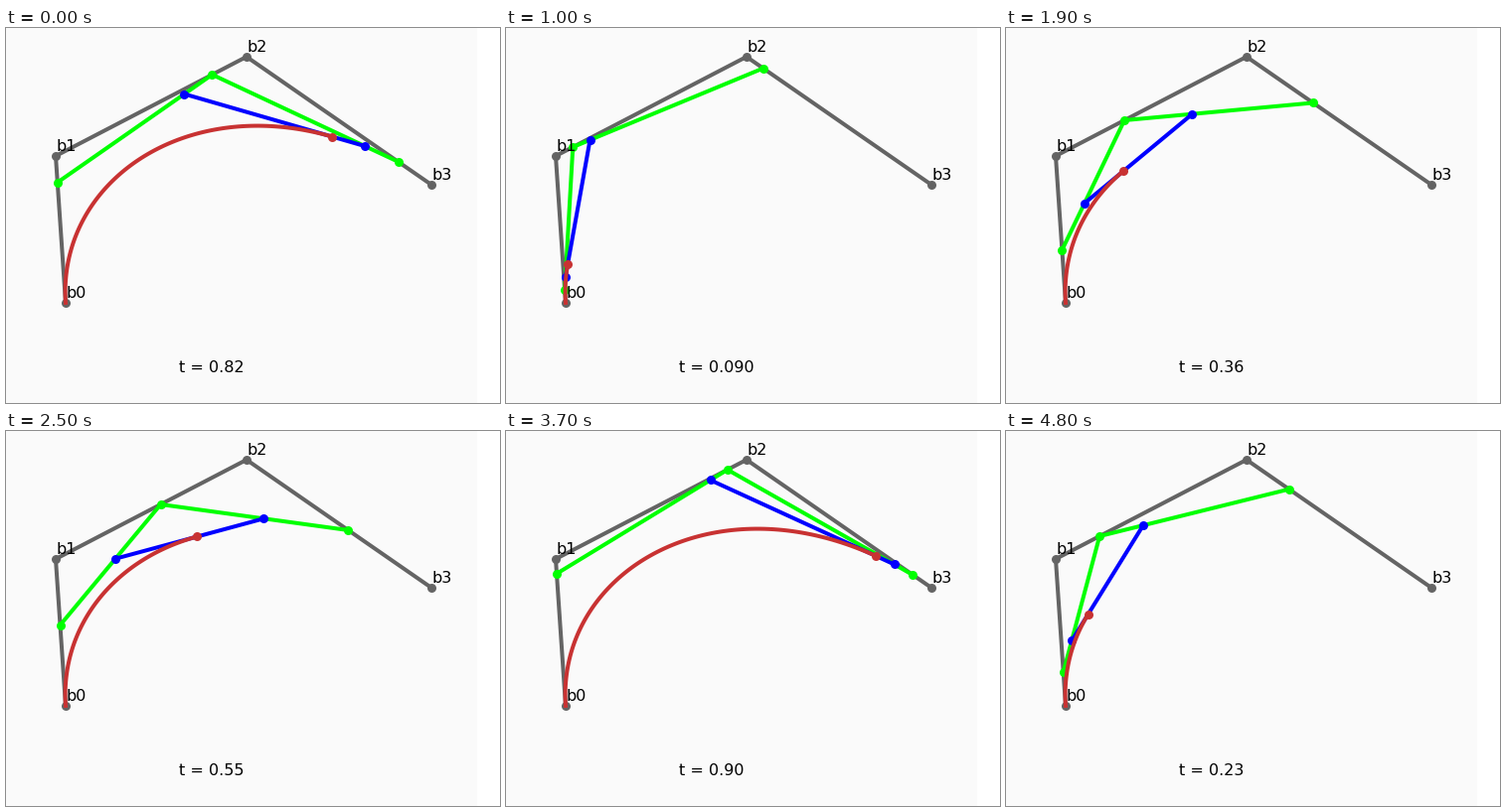
These frames come from a looping animation (497 px wide and 378 px high, 4.9 s). A matplotlib script:

```python
import numpy as np
import matplotlib.pyplot as plt
from matplotlib.animation import FuncAnimation
from matplotlib.patches import Rectangle

W, H, DPI = 497, 378, 100
FRAMES, INTERVAL = 49, 100
PX = 72 / DPI  # points per pixel

CONTROL = np.array([(60, 277), (50, 129), (242, 29), (428, 158)], float)

# Curve parameter over time: steady pace with a few hitches and hard restarts
KEY_FRAMES = [0, 5, 6, 7, 8, 9, 10, 21, 24, 25, 27, 28, 40, 41, 48]
KEY_VALUES = [.82, .97, 0, 0, .06, .06, .09, .42, .51, .55, .625, .63, .99, .02, .23]

plt.rcParams["font.family"] = "DejaVu Sans"
fig = plt.figure(figsize=(W / DPI, H / DPI), dpi=DPI, facecolor="white")
ax = fig.add_axes([0, 0, 1, 1])
ax.set_xlim(0, W)
ax.set_ylim(H, 0)
ax.axis("off")
ax.add_patch(Rectangle((0, 0), 474, H, color="#fafafa", lw=0, zorder=0))


def polyline(color, zorder, **kwargs):
    line, = ax.plot([], [], color=color, lw=4 * PX, marker="o", ms=9 * PX,
                    mew=0, zorder=zorder, snap=False, **kwargs)
    return line


def label(x, y, text):
    return ax.text(x, y, text, size=16 * PX, color="black",
                   ha="left", va="baseline", zorder=10)


def lerp_level(points, t):
    """One de Casteljau step."""
    return (1 - t) * points[:-1] + t * points[1:]


def bezier(t):
    t = np.asarray(t)[:, None]
    s = 1 - t
    p0, p1, p2, p3 = CONTROL
    return s**3 * p0 + 3 * s**2 * t * p1 + 3 * s * t**2 * p2 + t**3 * p3


def two_digits(t):
    """Two significant digits, trailing zeros kept."""
    return f"{t:.3f}" if 0 < t < 0.0995 else f"{t:.2f}"


polyline("#646464", 1).set_data(*CONTROL.T)
quadratic = polyline("#00ff00", 2)
linear = polyline("#0000ff", 3)
curve = polyline("#c83232", 4, markevery=[-1])

for i, (x, y) in enumerate(CONTROL):
    label(x, y - 5, f"b{i}")
readout = label(174, 347, "")


def update(frame):
    t = float(np.interp(frame, KEY_FRAMES, KEY_VALUES))
    level1 = lerp_level(CONTROL, t)
    level2 = lerp_level(level1, t)
    quadratic.set_data(*level1.T)
    linear.set_data(*level2.T)
    curve.set_data(*bezier(np.linspace(0, t, 100)).T)
    readout.set_text(f"t = {two_digits(t)}")
    return quadratic, linear, curve, readout


anim = FuncAnimation(fig, update, frames=FRAMES, interval=INTERVAL,
                     repeat=True, repeat_delay=0, blit=False)
plt.show()
```
